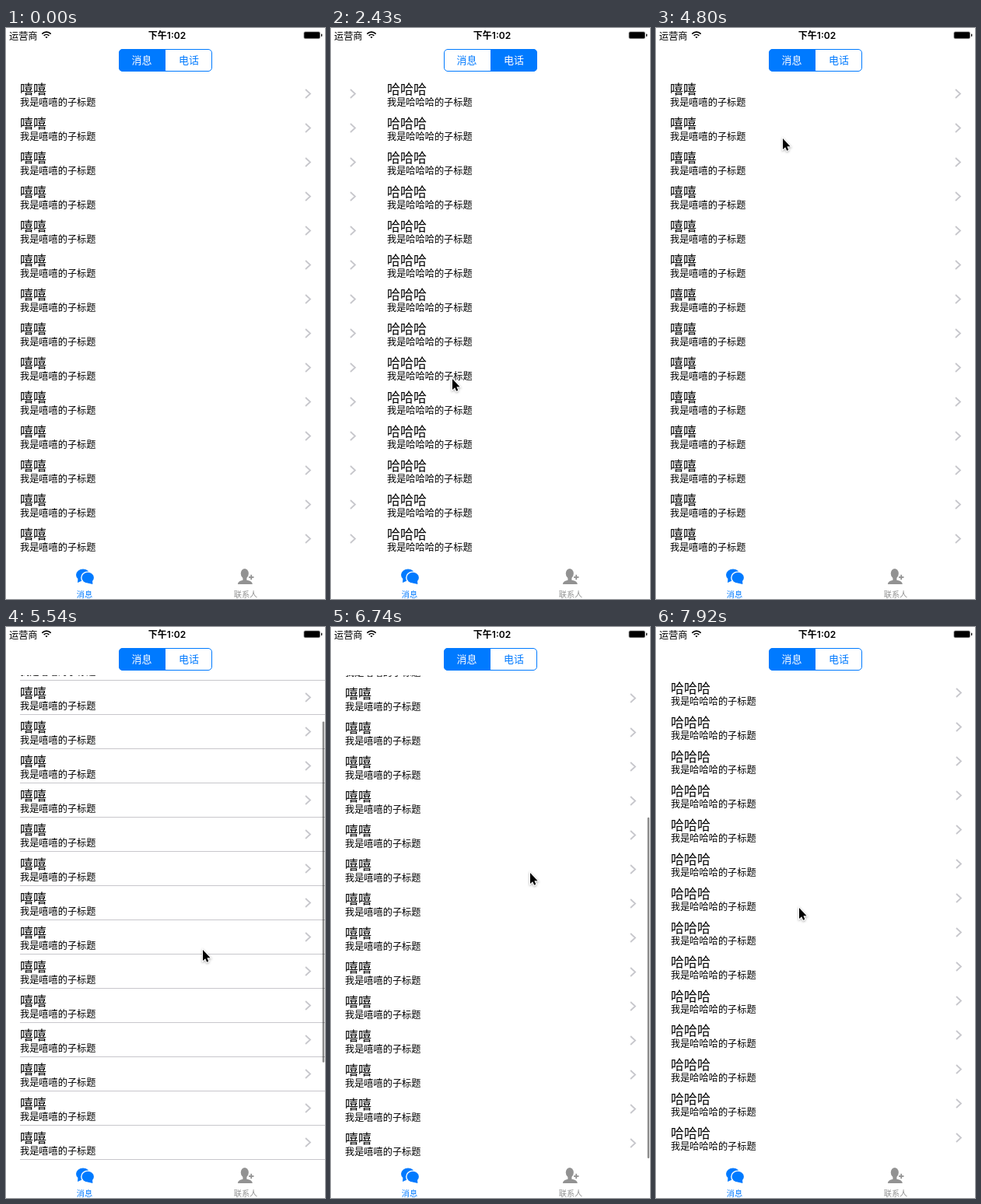
These frames come from a looping animation (410 by 734 pixels, 8 s). An HTML page with a canvas:

```html
<!DOCTYPE html>
<html lang="zh-CN">
<head>
<meta charset="utf-8">
<style>
html, body { margin: 0; width: 100%; height: 100%; overflow: hidden; background: #fff; }
canvas { display: block; }
</style>
</head>
<body>
<canvas id="stage" width="410" height="734"></canvas>
<script>
const ctx = document.getElementById('stage').getContext('2d');
const LOOP = 8000, FIRST = 500, STEP = 148.4;
const PAGE = 414, TOP = 62, BOTTOM = 685, ROW = 44, ROWS = 20;
const VIEW = BOTTOM - TOP, CONTENT = ROWS * ROW, MAX_SCROLL = CONTENT - VIEW;
const OVERSHOOT = 47.4;
const BLUE = '#007aff', GREY = '#929292';
const FONT = '"Noto Sans CJK SC", "Noto Sans CJK", sans-serif';

// Progress from 0 to 1 between two times.
const ramp = (t, start, end) => Math.min(1, Math.max(0, (t - start) / (end - start)));
const smooth = (t, start, end) => {
  const u = ramp(t, start, end);
  return u * u * (3 - 2 * u);
};
const between = (t, start, end) => t >= start && t < end;

// Tapping the tabs switches at once, swiping glides.
const tapped = t => between(t, 3600, 4360);
const swiped = t => smooth(t, 845, 1745) - smooth(t, 2280, 2940) + smooth(t, 7376, 7936);
const pageOffset = t => PAGE * (swiped(t) + tapped(t));
const callsSelected = t => between(t, 1830, 2860) || tapped(t);
const scrollOffset = t =>
  (MAX_SCROLL + OVERSHOOT) * smooth(t, 5240, 6139) - OVERSHOOT * smooth(t, 6139, 6740);

// Where the pointer rests or turns: time, x, y.
const POINTER = [
  [640, 370, 516], [1538, 194, 512], [2250, 150, 480], [3320, 225, 80], [3600, 233, 42],
  [4360, 174, 42], [4804, 163, 141], [5240, 255, 460], [6139, 249, 289], [7326, 262, 341],
  [7920, 184, 360]
];

function pointerAt(t) {
  const next = Math.max(1, POINTER.findIndex(p => p[0] >= t));
  const [t0, x0, y0] = POINTER[next - 1], [t1, x1, y1] = POINTER[next];
  const u = smooth(t, t0, t1);
  return [x0 + (x1 - x0) * u, y0 + (y1 - y0) * u];
}

function text(str, x, centerY, size, color = '#000', align = 'left') {
  ctx.font = `${size}px ${FONT}`;
  ctx.fillStyle = color;
  ctx.textAlign = align;
  ctx.fillText(str, x, centerY + size * .38);
}

function line(points, color, width) {
  ctx.beginPath();
  points.forEach(p => ctx.lineTo(...p));
  ctx.strokeStyle = color;
  ctx.lineWidth = width;
  ctx.stroke();
}

function polygon(points, color) {
  ctx.beginPath();
  points.forEach(p => ctx.lineTo(...p));
  ctx.closePath();
  ctx.fillStyle = color;
  ctx.fill();
}

function ellipse(x, y, rx, ry, color, start = 0) {
  ctx.beginPath();
  ctx.ellipse(x, y, rx, ry, 0, start, Math.PI * 2);
  ctx.fillStyle = color;
  ctx.fill();
}

function box(x, y, w, h, radius, color) {
  ctx.beginPath();
  ctx.roundRect(x, y, w, h, radius);
  ctx.fillStyle = color;
  ctx.fill();
}

function list(name, x, scroll) {
  // Hairlines are a third of a pixel, so they only show at some positions.
  const hairlines = Math.floor(scroll * 3) % 3 === 1;
  for (let i = 0; i < ROWS; i++) {
    const y = TOP + i * ROW - Math.round(scroll);
    text(name, x + 18, y + 16.5, 17);
    text(`我是${name}的子标题`, x + 18, y + 33.5, 12.2);
    line([[x + 385, y + 17], [x + 391, y + 22.5], [x + 385, y + 28]], '#c7c7cc', 1.8);
    if (hairlines) line([[x + 18, y + ROW + .5], [x + PAGE, y + ROW + .5]], '#c8c7cc', 1);
  }
}

function indicator(x, scroll, t) {
  const alpha = .45 * ramp(t, 5240, 5390) * (1 - ramp(t, 7000, 7360));
  const over = Math.max(0, scroll - MAX_SCROLL);
  const track = VIEW - 4, full = track * VIEW / CONTENT;
  const y = TOP + 2 + (track - full) * Math.min(1, scroll / MAX_SCROLL) + over;
  box(x + 406.7, y, 2.5, full - over, 1.2, `rgba(0,0,0,${alpha})`);
}

function statusBar() {
  text('运营商', 4, 10, 12.2);
  ctx.lineWidth = 1.7;
  ctx.strokeStyle = '#000';
  for (const radius of [1.3, 4.7, 8]) {
    ctx.beginPath();
    ctx.arc(52, 13.2, radius, -Math.PI * .75, -Math.PI * .25);
    ctx.stroke();
  }
  ctx.font = `600 12px Inter, ${FONT}`;
  ctx.textAlign = 'center';
  ctx.fillText('下午1:02', 207, 14.2);
  box(382.5, 4.5, 21.5, 9.5, 2, '#999');
  box(383.3, 5.3, 19.9, 7.9, 1.5, '#000');
  box(405, 7.5, 1.3, 3.5, 1, '#000');
}

function segments(calls) {
  box(calls ? 205 : 145, 27, 60, 29, calls ? [0, 5, 5, 0] : [5, 0, 0, 5], BLUE);
  ctx.beginPath();
  ctx.roundRect(145.5, 27.5, 119, 28, 4.5);
  ctx.strokeStyle = BLUE;
  ctx.lineWidth = 1;
  ctx.stroke();
  text('消息', 174.5, 41.5, 13, calls ? BLUE : '#fff', 'center');
  text('电话', 235, 41.5, 13, calls ? '#fff' : BLUE, 'center');
}

function bubblesIcon() {
  ellipse(99, 703, 9, 7.5, BLUE);
  polygon([[92.5, 707], [92, 713], [99, 710]], BLUE);
  ellipse(105.2, 706.7, 9.1, 8.3, '#fff');
  ellipse(105.2, 706.7, 7.7, 6.9, BLUE);
  polygon([[105, 713.4], [111.4, 715], [111, 710]], BLUE);
}

function personIcon() {
  ellipse(306.8, 701.3, 5, 6.3, GREY);
  box(304.4, 706, 5, 5, 0, GREY);
  ellipse(307.3, 715, 9.5, 5.5, GREY, Math.PI);
  line([[312, 706], [318.5, 706]], GREY, 1.8);
  line([[315.2, 702.8], [315.2, 709.2]], GREY, 1.8);
}

function tabBar() {
  bubblesIcon();
  text('消息', 101, 728.5, 10.2, BLUE, 'center');
  personIcon();
  text('联系人', 308, 728.5, 10.2, GREY, 'center');
}

const arrow = new Path2D('M0 0V14L3.2 11.2L5.2 15.8L7.3 14.8L5.4 10.3H9.6Z');

function pointer(t) {
  if (t < POINTER[0][0]) return;
  const [x, y] = pointerAt(t);
  ctx.save();
  ctx.translate(Math.round(x), Math.round(y) + 1);
  ctx.shadowColor = 'rgba(0,0,0,.35)';
  ctx.shadowBlur = 3;
  ctx.shadowOffsetY = 1;
  ctx.strokeStyle = '#fff';
  ctx.lineWidth = 2;
  ctx.stroke(arrow);
  ctx.shadowColor = 'transparent';
  ctx.fillStyle = '#000';
  ctx.fill(arrow);
  ctx.restore();
}

function draw(t) {
  const x = -Math.round(pageOffset(t)), scroll = scrollOffset(t);
  ctx.fillStyle = '#fff';
  ctx.fillRect(0, 0, 410, 734);
  ctx.save();
  ctx.beginPath();
  ctx.rect(0, TOP, 410, VIEW);
  ctx.clip();
  list('嘻嘻', x, scroll);
  list('哈哈哈', x + PAGE, 0);
  indicator(x, scroll, t);
  ctx.restore();
  statusBar();
  segments(callsSelected(t));
  tabBar();
  pointer(t);
}

// The picture advances in even steps after an opening pause.
function frame(now) {
  const step = Math.floor((now % LOOP - FIRST + 10) / STEP);
  draw(step < 0 ? 0 : FIRST + step * STEP);
  requestAnimationFrame(frame);
}
requestAnimationFrame(frame);
</script>
</body>
</html>
```
